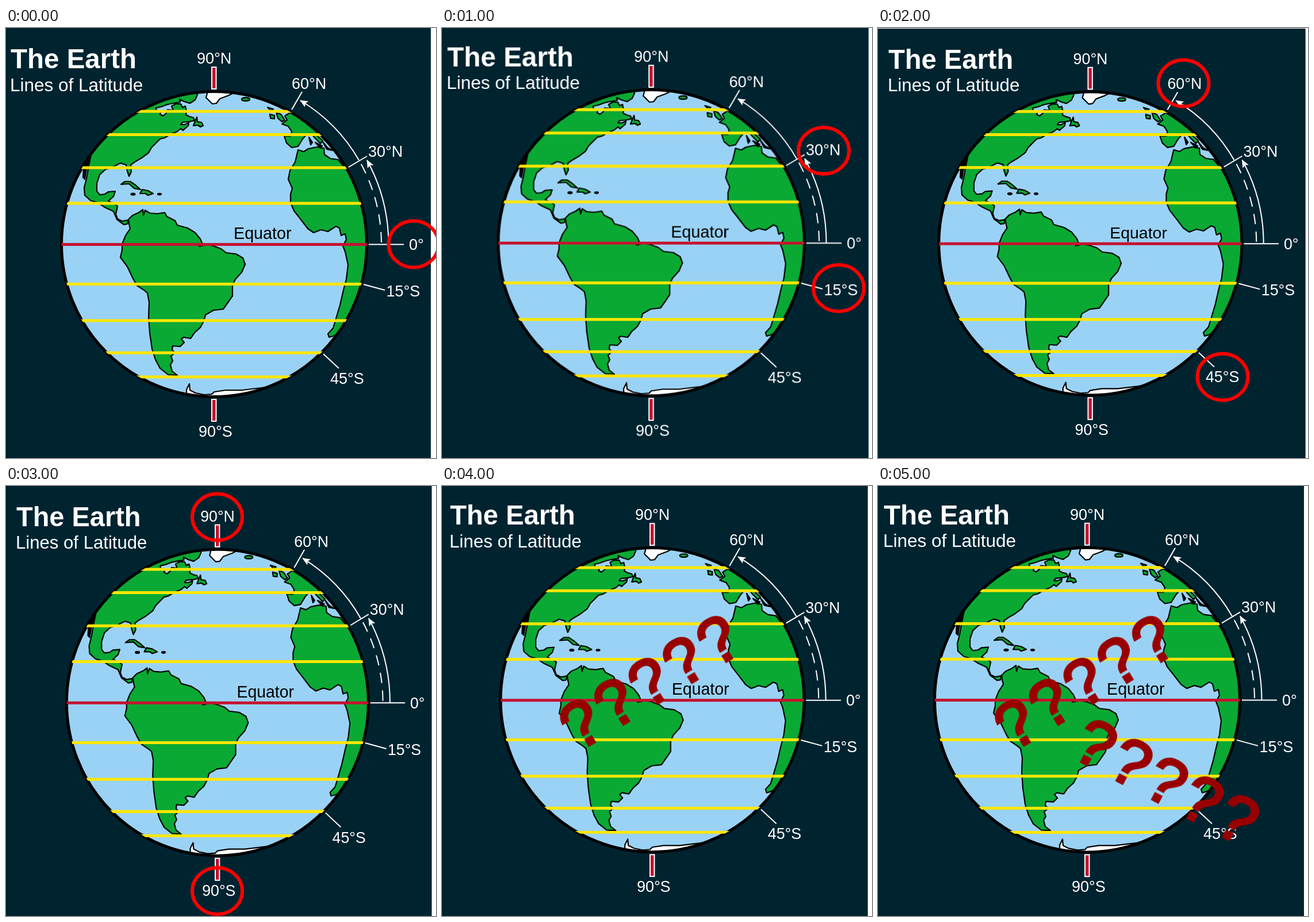
These frames come from a looping animation (748x748 px, 6000 ms). An HTML page:

```html
<!DOCTYPE html>
<html lang="en">
<head>
<meta charset="utf-8">
<title>Lines of Latitude</title>
<style>
html, body { margin: 0; width: 100%; height: 100%; overflow: hidden; background: #fff; }
svg { display: block; width: 100%; height: 100%; }
text { font-family: "Liberation Sans", Arial, sans-serif; fill: #fff; }

/* The whole chart jumps a little at every step. */
.chart { animation: jump 6s step-end infinite; }
@keyframes jump {
  0%, 100% { transform: matrix(1, 0, 0, 1, 0, 0); }
  16.666% { transform: matrix(1.003, 0, 0, 1.0025, 1, -3.3); }
  33.333% { transform: matrix(.9928, 0, 0, .994, 10, 1.1); }
  50% { transform: matrix(.9885, 0, 0, 1.0035, 10.1, -.6); }
  66.666% { transform: matrix(.9942, 0, 0, .9965, 6, -2.5); }
  83.333% { transform: matrix(1, 0, 0, .9975, 2, -3); }
}

/* Each overlay is on for one second, starting at second --i. */
.step { opacity: 0; animation: show 6s step-end calc(var(--i) * 1s - 6s) infinite; }
@keyframes show {
  0% { opacity: 1; }
  16.666%, 100% { opacity: 0; }
}

.land path, .land ellipse { fill: #09a934; stroke: #000; stroke-width: 2.2; stroke-linejoin: round; }
.land .ice { fill: #fff; }
.land .dark { fill: #000; }
.parallels { stroke: #ffe600; stroke-width: 5; }
.pole { fill: #c4122f; stroke: #fff; stroke-width: 2; }
.leaders { fill: none; stroke: #fff; stroke-width: 2; }
.labels { font-size: 27px; }
.ring { fill: none; stroke: #f00; stroke-width: 6; }
.marks { font-size: 113px; letter-spacing: 7px; fill: #900; stroke: #900; stroke-width: 4.5; }
</style>
</head>
<body>
<svg viewBox="0 0 748 748" preserveAspectRatio="none">
  <defs>
    <clipPath id="disc"><circle cx="362" cy="376" r="265.5"/></clipPath>
    <marker id="head" markerUnits="userSpaceOnUse" markerWidth="16" markerHeight="14"
            viewBox="-15 -7 16 14" orient="auto" overflow="visible">
      <path d="M1 0L-13 -6L-10 0L-13 6Z" fill="#fff"/>
    </marker>
    <text id="rising" class="marks" transform="translate(235.5 463.5) rotate(-31.4)">?????</text>
  </defs>

  <g class="chart">
    <path d="M-20 0H739V800H-20Z" fill="#002330"/>
    <circle cx="362" cy="376" r="265.5" fill="#9ad2f5"/>

    <g class="land" clip-path="url(#disc)">
      <!-- North and Central America -->
      <path d="M329 100L333 116L329 125L320 131L310 128L302 124L303 129L290 131L281 133L270 137L261 139
        L262 144L270 145L268 150L273 153L279 148L281 142L291 143L288 136L295 132L304 132L307 138L312 136
        L314 145L313 151L319 154L326 156L328 161L318 163L307 164L304 168L311 168L318 165L317 170L308 178
        L304 175L298 180L286 185L276 191L268 193L260 201L253 208L248 217L236 226L224 233L217 238L218 250
        L214 258L211 249L209 238L199 235L191 239L184 243L173 246L163 255L158 270L158 284L163 290L172 289
        L178 285L190 284L187 293L178 301L189 306L194 310L191 324L194 332L202 336L213 334L211 341L205 342
        L193 333L187 319L172 312L160 304L147 300L137 291L136 278L140 262L143 245L148 220L100 200L100 100Z"/>
      <path class="dark" d="M149 218L140 245L137 263L134 260L135 243Z"/>
      <path d="M326 170L329 162L332 155L333 163L340 164L343 170L338 172L334 169Z"/>
      <!-- Caribbean -->
      <path d="M200 272L207 267L216 267L225 273L234 281L223 279L214 271Z"/>
      <path d="M233 288L237 281L247 283L256 288L247 291L243 288Z"/>
      <ellipse class="dark" cx="221" cy="289" rx="3.5" ry="1.5"/>
      <ellipse class="dark" cx="267" cy="289" rx="3" ry="1.2"/>
      <!-- South America -->
      <path d="M213 333L220 326L231 321L238 316L239 326L242 317L250 322L263 323L276 321L280 328L294 335
        L298 343L316 348L329 356L338 367L341 374L336 380L349 377L360 379L374 384L383 391L400 393L412 400
        L416 411L410 425L399 437L394 447L394 466L385 479L378 489L361 491L347 499L344 510L338 521L328 530
        L321 540L309 538L305 541L310 547L303 554L290 553L289 560L294 565L287 571L290 579L286 586L289 597
        L298 604L282 603L268 592L260 577L254 558L250 530L248 502L249 477L246 461L240 456L228 448L221 436
        L211 415L199 399L202 386L202 376L208 361L216 349L214 341Z"/>
      <!-- Africa -->
      <path d="M508 212L518 215L526 210L541 207L553 209L554 220L564 227L578 229L586 239L600 225L660 300
        L650 480L606 479L602 490L592 510L581 526L572 535L562 538L560 532L569 522L573 509L581 482L587 456
        L592 437L595 412L590 389L586 379L592 368L590 358L583 361L580 348L574 345L560 354L548 351L535 356
        L525 349L512 332L501 318L495 304L495 289L498 279L491 263L494 248L503 233Z"/>
      <!-- Europe -->
      <path d="M488 130L493 148L485 153L489 160L480 167L491 171L497 180L495 188L484 188L488 200L497 208
        L508 206L516 193L522 186L531 184L538 192L547 201L551 196L541 187L548 187L561 200L568 211L578 218
        L600 220L600 120Z"/>
      <path class="dark" d="M527 190L533 199L530 203ZM538 199L550 205L547 209ZM551 198L559 208L568 213L558 211Z"/>
      <path d="M470 147L478 150L485 160L480 163L473 157ZM459 150L467 152L467 158L460 157ZM455 138L465 141L461 144Z"/>
      <!-- Arctic and Antarctic -->
      <path class="ice" d="M347 100L350 114L348 121L359 132L366 131L372 123L388 117L399 111L405 100Z"/>
      <ellipse cx="417" cy="124" rx="7" ry="2.8"/>
      <path class="ice" d="M314 660L314 629L319 619L320 630L330 635L345 638L358 637L362 633L382 630L410 630L452 625L440 660Z"/>
    </g>

    <circle cx="362" cy="376" r="265.5" fill="none" stroke="#000" stroke-width="5"/>
    <g clip-path="url(#disc)">
      <path class="parallels" d="M90 145H640M90 185.500H640M90 243H640M90 305H640M90 445.500H640M90 509H640M90 565H640M90 607H640"/>
      <path d="M90 376.500H640" stroke="#c4122f" stroke-width="5"/>
    </g>

    <rect class="pole" x="358" y="68" width="7.500" height="38"/>
    <rect class="pole" x="358" y="646" width="7.500" height="38"/>

    <g class="leaders">
      <path d="M515 111L497 142M628 223L596 242M631 376.500H692M622 446L659 456M552 567L579 592"/>
      <path d="M614 230A291 291 0 0 0 512 126" marker-end="url(#head)"/>
      <path d="M665.500 376A303 303 0 0 0 628 230" marker-end="url(#head)"/>
      <path d="M653 373A291 291 0 0 0 614 230" stroke-dasharray="18 13"/>
    </g>

    <text x="8" y="70" font-size="47.500" font-weight="700">The Earth</text>
    <text x="7" y="109.500" font-size="31.500">Lines of Latitude</text>
    <text x="396" y="367" font-size="28.700" style="fill:#000">Equator</text>
    <g class="labels">
      <text x="332" y="62">90°N</text>
      <text x="497" y="106">60°N</text>
      <text x="630" y="224">30°N</text>
      <text x="701" y="386">0°</text>
      <text x="661.500" y="467">15°S</text>
      <text x="564" y="619">45°S</text>
      <text x="335" y="711">90°S</text>
    </g>
  </g>

  <g class="step" style="--i:0">
    <ellipse class="ring" cx="709" cy="376" rx="43.500" ry="40.500"/>
  </g>
  <g class="step" style="--i:1">
    <ellipse class="ring" cx="664" cy="213.500" rx="44" ry="40.500"/>
    <ellipse class="ring" cx="690" cy="452.500" rx="44" ry="40.500"/>
  </g>
  <g class="step" style="--i:2">
    <ellipse class="ring" cx="531.500" cy="96" rx="44" ry="40.500"/>
    <ellipse class="ring" cx="599.500" cy="607" rx="44" ry="40.500"/>
  </g>
  <g class="step" style="--i:3">
    <ellipse class="ring" cx="367.500" cy="54" rx="43.500" ry="40.500"/>
    <ellipse class="ring" cx="367.500" cy="704.500" rx="43.500" ry="40.500"/>
  </g>
  <g class="step" style="--i:4"><use href="#rising"/></g>
  <g class="step" style="--i:5">
    <use href="#rising" x="-2"/>
    <text class="marks" transform="translate(332.5 468.5) rotate(27.8)">?????</text>
  </g>
</svg>
</body>
</html>
```
